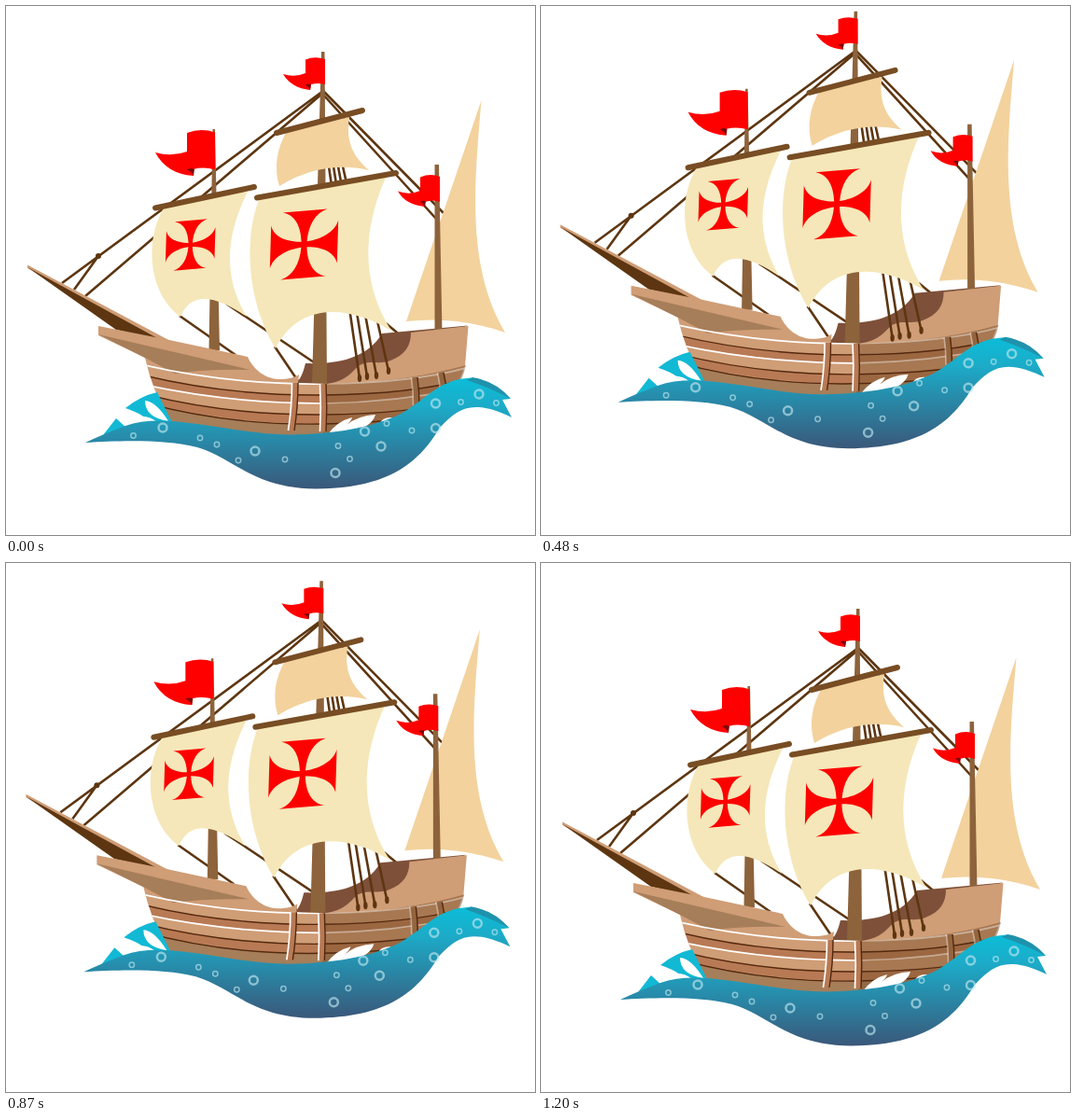
An HTML page that plays this animation: 567x567 px, repeating every 1.23 s.

```html
<!DOCTYPE html>
<html lang="en">
<head>
<meta charset="utf-8">
<title>Sailing ship</title>
<style>
  html, body { margin: 0; width: 100%; height: 100%; overflow: hidden; background: #fff; }
  svg { display: block; width: 100vw; height: 100vh; }
  .line { fill: none; stroke: #5d3611; stroke-width: 2.6; }
  .yard { fill: none; stroke: #784d24; stroke-width: 6; stroke-linecap: round; }
  .mast { fill: #8d633c; }
  .sail { fill: #f5e7b9; }
  .tan { fill: #f3d29d; }
  .light { fill: #cf9d76; }
  .shade { fill: #a67e59; }
  .plank { fill: #b87a54; }
  .inside { fill: #7e5039; }
  .red { fill: #f00; }
  .fold { fill: #7c0808; }
  .seam { fill: none; stroke: #54290f; stroke-width: 1.4; }
  .trim { fill: none; stroke: #fff; stroke-width: 1.7; }
</style>
</head>
<body>
<svg viewBox="0 0 567 567">
  <defs>
    <linearGradient id="sea" gradientUnits="userSpaceOnUse" x1="0" y1="400" x2="0" y2="517">
      <stop offset="0" stop-color="#0cbcd7"/>
      <stop offset=".25" stop-color="#1cabc8"/>
      <stop offset="1" stop-color="#3a587a"/>
    </linearGradient>
    <clipPath id="hull">
      <path d="M149 376L259 376C264 387 275 399 292 400L316 404L344 405C400 403 445 398 493 385Q489 402 478 420L400 460H190L176 445Q156 410 149 376Z"/>
    </clipPath>
    <path id="cross" class="red" d="M-24 -36H24C11 -33 4 -20 3 -3C19 -4 33 -11 36 -23V23C33 11 19 4 3 3C4 20 11 33 24 36H-24C-11 33 -4 20 -3 3C-19 4 -33 11 -36 23V-23C-33 -11 -19 -4 -3 -3C-4 -20 -11 -33 -24 -36Z"/>
  </defs>
  <g id="ship">
    <!-- rear rigging -->
    <path class="line" d="M340 91L60 297M340 93L85 311M99 268L73 304M340 91L469 222M340 95L461 228M186 332L246 374M236 319L360 402M288 365L315 405M407 340L436 364"/>
    <circle cx="99" cy="268" r="3" fill="#5d3611"/>

    <!-- lateen sail -->
    <path class="tan" d="M509.500 101C502 190 493 280 535 350Q483 332 429 338Z"/>

    <!-- deck interior and masts -->
    <path class="inside" d="M311 405C318 396 319 390 321 383C350 384 386 380 403 351L495 342.500L436 368L400 396L345 406Z"/>
    <path class="mast" d="M221.500 132H224L229 369H217.500Z"/>
    <path class="mast" d="M338 49H341.500L344 406H328Z"/>
    <path class="mast" d="M459.500 170H464L467.500 350H459.500Z"/>

    <!-- bowsprit -->
    <path class="light" d="M23 277.500L180 361L160 358L23 281Z"/>
    <path d="M23 280L164 357L118 347Z" fill="#5d3611"/>

    <!-- hull -->
    <path class="light" d="M99 343L175 358L259 376C264 387 275 399 292 400C303 400 310 398 314 395L313 404L344 405C366 402 371 391 379 385C390 379 400 385 412 380C428 374 434 364 434 350L495.500 343L492 386L478 420L400 460H190L176 445Q156 410 149 377L99 353Z"/>
    <path class="shade" d="M99 352L262 390Q215 389 181 394L149 377Z"/>
    <g clip-path="url(#hull)">
      <path class="plank" d="M148 396Q240 418 340 417T500 398V408Q420 425 340 426T148 406Z"/>
      <path class="plank" d="M148 416Q240 439 340 438T500 420V430Q430 447 340 448T148 425Z"/>
      <path class="shade" d="M148 425Q240 450 340 448T500 430V470H148Z"/>
      <path d="M340 405Q430 404 495 384V420L400 462H340Z" fill="#80552f" opacity=".5"/>
      <path class="seam" d="M148 396Q240 418 340 417T500 398M148 416Q240 439 340 438T500 420M148 425Q240 450 340 448T500 430"/>
      <path class="trim" d="M148 385Q240 406 340 405M148 406Q240 426 340 426"/>
      <path class="trim" d="M340 405Q440 404 500 386M340 426Q420 425 500 408" opacity=".4"/>
    </g>
    <g id="ribs"></g>

    <!-- shrouds -->
    <path class="line" d="M346 172L379 399M351 172L387 397M356 172L397 396M361 172L410 391"/>
    <g id="blocks" fill="#5d3611"></g>

    <!-- sails -->
    <path class="tan" d="M301 134L368 119C364 145 371 160 389 176C358 169 326 173 293 193C287 173 290 153 301 134Z"/>
    <path class="sail" d="M272 205L408 182C386 230 376 290 413 348C370 322 315 315 289 367C262 325 252 255 272 205Z"/>
    <path class="sail" d="M170 215L261 195C235 245 232 290 258 333C230 314 200 302 187 333C152 308 148 250 170 215Z"/>
    <path class="yard" d="M290 136L382 112M269 205.500L418 179M160 216.500L266 194"/>
    <use href="#cross" transform="matrix(1 -.085 -.03 1 319.500 255.500)"/>
    <use href="#cross" transform="matrix(.73 -.06 -.022 .73 197.700 256)"/>

    <!-- flags -->
    <path class="red" d="M342 57Q331 53.500 321 57.500V72Q309 77 297 73Q306 88 326 90L327 84Q334 82 342 84Z"/>
    <path class="fold" d="M321 84.500Q324 83 327 84L326 90Q324 86 321 84.500Z"/>
    <path class="red" d="M224 135.500Q209 130.500 194 136V156Q178 162 160 157Q172 180 201 182V175Q212 172 224 175.500Z"/>
    <path class="fold" d="M194 175.500Q198 173 202 175L201 182Q199 177 194 175.500Z"/>
    <path class="red" d="M465 183Q455 179 444 183.500V198Q432 203 420 198.500Q428 213 449 215V210Q457 207 465 210Z"/>
    <path class="fold" d="M444 210Q447 208 450 209.500L449 215Q447 211 444 210Z"/>

    <!-- water -->
    <path d="M128 431Q144 418 162 414L178 446L150 449Q157 441 128 431ZM104 460L118 442L129 452Z" fill="#12b9d4"/>
    <path d="M149 423Q161 424 174 445Q149 441 149 423ZM137 441Q151 437 162 446L146 447Z" fill="#fff"/>
    <path d="M345 459Q355 445 371 441Q370 445 365 449Q377 439 396 438Q394 446 383 452Z" fill="#fff"/>
    <path d="M400 448Q404 440 414 441L410 449Z" fill="#fff"/>
    <path fill="url(#sea)" d="M85 468Q104 459 128 450Q148 443 178 445C225 449 260 459 305 459.500C350 459 395 452 425 436C455 418 463 401 498 398.500Q522 402 541 421L532 422L542 441C500 421 485 430 465 452C442 490 410 517 332 517.500C265 517 245 485 205 473C170 464 120 466 85 468Z"/>
    <path d="M500 398Q525 402 541 421Q521 410 494 401Z" fill="#1f92ac"/>
    <g id="foam" fill="none" stroke="#bfe6ee" stroke-opacity=".65"></g>
  </g>
</svg>
<script>
  const $ = id => document.getElementById(id);

  const ring = (r, w) => ([x, y]) => `<circle cx="${x}" cy="${y}" r="${r}" stroke-width="${w}"/>`;
  const big = [[168, 452], [267, 477], [353, 500.5], [384.5, 456], [402, 472], [460.5, 426], [460.5, 452.5], [507, 416]];
  const small = [[136.5, 460.5], [208, 463], [226, 470], [249, 487], [299, 486], [356, 471.5],
    [368.5, 485.5], [408, 447.5], [435, 455], [487.5, 424.5], [525.5, 425.5]];
  $('foam').innerHTML = big.map(ring(4.5, 2.5)).join('') + small.map(ring(2.7, 1.5)).join('');

  $('blocks').innerHTML = [[379, 399], [387, 397], [397, 396], [410, 391]]
    .map(([x, y]) => `<ellipse cx="${x}" cy="${y}" rx="2.2" ry="4"/>`).join('');

  // Upright timber: start point, end point, sideways bend, colour, trim opacity
  function rib(x, y, u, v, bend, color, trim) {
    const path = dx => `M${x + dx} ${y}Q${(x + u) / 2 + bend + dx} ${(y + v) / 2} ${u + dx} ${v}`;
    return `<path d="${path(0)}" fill="none" stroke="${color}" stroke-width="6.5"/>` +
      `<path class="trim" d="${path(-3.5)}" opacity="${trim}"/>` +
      `<path class="seam" d="${path(3)}"/>`;
  }
  $('ribs').innerHTML =
    rib(310, 404, 306, 455, 2, '#b87a54', 1) +
    rib(340, 405, 340, 456, 1.5, '#b87a54', 1) +
    rib(438, 398, 440, 428, 1, '#94643e', .4) +
    rib(466, 393, 469, 414, 1, '#94643e', .4);

  const STEP = 30, STEPS = 41, TOP = 20;
  let start;

  function draw(ms) {
    const n = Math.floor(ms / STEP) % STEPS;
    const lift = TOP - Math.abs(TOP - n);
    $('ship').setAttribute('transform', `translate(${-0.15 * lift} ${-2.7 * lift})`);
  }

  function tick(now) {
    start ??= now;
    draw(Math.max(0, now - start));
    requestAnimationFrame(tick);
  }
  draw(0);
  requestAnimationFrame(tick);
</script>
</body>
</html>
```
